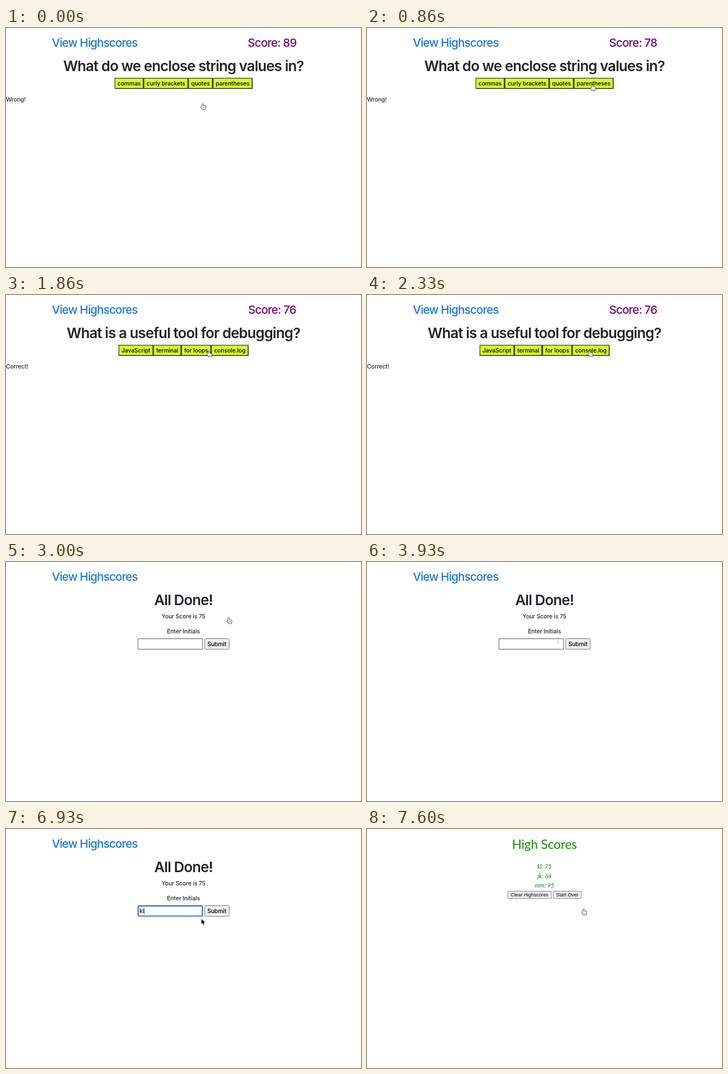
These frames come from a looping animation (640x432 px, 8 s). An HTML page with a canvas:

```html
<!DOCTYPE html>
<html lang="en">
<head>
<meta charset="utf-8">
<title>Quiz</title>
<style>
html, body { margin: 0; width: 100%; height: 100%; overflow: hidden; background: #fff; }
canvas { display: block; width: 640px; height: 432px; }
</style>
</head>
<body>
<canvas id="stage"></canvas>
<script>
const LOOP = 8000, STEP = 1000 / 15;
const SCALE = 2 / 3; // page zoom: 16px text shows as 10.67px
const MID = 320;
const canvas = document.getElementById('stage');
const ctx = canvas.getContext('2d');
const dpr = window.devicePixelRatio || 1;
canvas.width = 640 * dpr;
canvas.height = 432 * dpr;

const UI = 'Inter, "Noto Sans", sans-serif';
const ARIAL = '"Liberation Sans", Arial, sans-serif';
const SCRIPT = 'Papyrus, Lato, fantasy';
const INK = '#212529', GREEN = '#15880c';

const QUIZ = [
  { title: 'What do we enclose string values in?', note: 'Wrong!',
    answers: ['commas', 'curly brackets', 'quotes', 'parentheses'] },
  { title: 'What is a useful tool for debugging?', note: 'Correct!',
    answers: ['JavaScript', 'terminal', 'for loops', 'console.log'] }
];
const ANSWERS = { x: 197, y: 90, w: 246, h: 20 };
const INPUT = { x: 237.3, y: 138, w: 117.6, h: 20.3 };
const SUBMIT = { x: 357.5, y: 138, w: 45.3, h: 20.3 };
const T = { penalty: 130, next: 1730, done: 3000, focus: 4330, type: 5660, scores: 7600 };

const START = { x: 355, y: 137 };
const MOVES = [
  { from: 60, to: 260, x: 361, y: 154 },
  { from: 400, to: 860, x: 407, y: 103 },
  { from: 1000, to: 1530, x: 366, y: 101 },
  { from: 1860, to: 2330, x: 402, y: 101, dip: 14 },
  { from: 3530, to: 3930, x: 345, y: 141 },
  { from: 6730, to: 7530, x: 391, y: 145, dip: 29 }
];

function text(str, x, y, size, o = {}) {
  ctx.font = `${o.style || ''} ${o.weight || 400} ${size}px ${o.font || UI}`;
  ctx.letterSpacing = (o.track || 0) * size + 'px';
  ctx.textAlign = o.align || 'center';
  ctx.fillStyle = o.color || INK;
  ctx.fillText(str, x, y);
  return ctx.measureText(str).width;
}

const header = (str, x, color) => text(str, x, 34, 20.7, { color, weight: 500, track: -0.04 });
const heading = str => text(str, MID, 78.1, 26, { weight: 600, track: -0.034 });
const small = (str, x, y, o) => text(str, x, y, 10.4, { weight: 450, track: -0.008, ...o });

function box({ x, y, w, h }, fill, line, width, r) {
  ctx.beginPath();
  ctx.roundRect(x + width / 2, y + width / 2, w - width, h - width, r);
  ctx.fillStyle = fill;
  ctx.fill();
  ctx.strokeStyle = line;
  ctx.lineWidth = width;
  ctx.stroke();
}

function rect(x, y, w, h, fill) {
  ctx.fillStyle = fill;
  ctx.fillRect(x, y, w, h);
}

function answer(label, x, w) {
  const { y, h } = ANSWERS, b = 2 * SCALE;
  rect(x, y, w, h, '#4d4d43');
  rect(x + b, y + b, w - b, h - b, '#16180a');
  rect(x + b, y + b, w - 2 * b, h - 2 * b, '#d8fa2d');
  small(label, x + w / 2, 104, { color: '#000' });
}

function answerRow(labels) {
  ctx.font = `450 10.4px ${UI}`;
  ctx.letterSpacing = '-0.08px';
  const widths = labels.map(s => ctx.measureText(s).width + 16 * SCALE);
  let x = MID - widths.reduce((a, b) => a + b) / 2;
  labels.forEach((s, i) => {
    answer(s, x, widths[i]);
    x += widths[i];
  });
}

const score = t => t < T.penalty ? 89 : 78 - Math.floor((t - T.penalty) / 867);

function quiz(t) {
  const q = QUIZ[t < T.next ? 0 : 1];
  header('Score: ' + score(t), 479.7, '#720670');
  heading(q.title);
  answerRow(q.answers);
  small(q.note, 0, 132.8, { align: 'left' });
}

function form(t) {
  const focused = t >= T.focus;
  heading('All Done!');
  small('Your Score is 75', MID, 102);
  small('Enter Initials', MID, 128.8);
  box(INPUT, '#fff', focused ? '#1c67b8' : '#767676', focused ? 1.9 : 1.2, focused ? 1.5 : 0.5);
  box(SUBMIT, '#efefef', '#767676', 1, 1.8);
  small('Submit', 380.2, 152.2, { color: '#000' });

  const typed = 'kl'.slice(0, Math.max(0, Math.floor((t - T.type) / 340) + 1));
  const w = small(typed, 240.6, 152.2, { align: 'left', color: '#000' });
  const caret = t >= 5000 && (t - 5000) % 920 < 460;
  if (caret) rect(240.8 + w, 143, 0.7, 11, '#000');
}

function smallButton(label, x, w) {
  box({ x, y: 112, w, h: 14 }, '#efefef', '#767676', 0.9, 1.6);
  text(label, x + w / 2, 122.2, 8.9, { font: ARIAL, color: '#000' });
}

function scores() {
  const o = { font: SCRIPT, color: GREEN };
  text('High Scores', MID, 35.6, 22.5, o);
  ['kl: 75', 'jk: 64', 'mm: 95'].forEach((s, i) =>
    text(s, MID, 72.2 + i * 16.8, 11, { ...o, style: 'italic' }));
  smallButton('Clear Highscores', 253.3, 79.4);
  smallButton('Start Over', 335.2, 51.5);
}

const POINTERS = {
  hand() {
    const shape = new Path2D();
    shape.roundRect(-1.5, 0, 1.9, 8, 1);
    for (let i = 0; i < 3; i++) shape.roundRect(0.1 + i * 1.5, 3.3 + i * 0.4, 1.7, 5, 0.8);
    shape.roundRect(-3.5, 5, 4, 2.4, 1);
    shape.roundRect(-1.5, 5.6, 6.1, 4.4, 1.3);
    ctx.strokeStyle = '#222';
    ctx.lineWidth = 1.5;
    ctx.stroke(shape);
    ctx.fillStyle = '#fff';
    ctx.fill(shape);
    for (let i = 0; i < 3; i++) rect(i * 1.5, 6.4, 0.6, 2.2, '#777');
  },
  arrow() {
    const shape = new Path2D('M0 0V9.4L2.2 7.4L3.7 10.8L5.1 10.2L3.6 6.9H6.6Z');
    ctx.strokeStyle = '#fff';
    ctx.lineWidth = 1.2;
    ctx.stroke(shape);
    ctx.fillStyle = '#000';
    ctx.fill(shape);
  },
  beam() {
    rect(-0.3, -4, 0.6, 8, '#aaa');
    for (const y of [-4.3, 3.6]) rect(-1.5, y, 3, 0.7, '#777');
  }
};

const inside = (p, b) => p.x >= b.x && p.x <= b.x + b.w && p.y >= b.y && p.y <= b.y + b.h;

function pointerAt(t) {
  let p = START;
  for (const m of MOVES) {
    if (t < m.from) break;
    const u = Math.min(1, (t - m.from) / (m.to - m.from));
    const e = u * u * (3 - 2 * u);
    p = {
      x: p.x + (m.x - p.x) * e,
      y: p.y + (m.y - p.y) * e + (m.dip || 0) * Math.sin(Math.PI * u)
    };
  }
  return p;
}

function pointerKind(t, p) {
  // a resting hand stays until the pointer next moves
  const resting = t < MOVES[0].from || (t >= T.done && t < MOVES[4].from) || t >= MOVES[5].to;
  if (resting) return 'hand';
  if (t < T.done) return inside(p, ANSWERS) ? 'hand' : 'arrow';
  if (inside(p, INPUT)) return 'beam';
  return inside(p, SUBMIT) ? 'hand' : 'arrow';
}

function draw(now) {
  // the screen refreshes fifteen times a second
  const t = Math.floor(((now % LOOP) + 7) / STEP) * STEP % LOOP;
  ctx.setTransform(dpr, 0, 0, dpr, 0, 0);
  rect(0, 0, 640, 432, '#fff');
  if (t < T.scores) {
    header('View Highscores', 160, '#1877dc');
    t < T.done ? quiz(t) : form(t);
  } else {
    scores();
  }
  const p = pointerAt(t);
  ctx.translate(p.x, p.y);
  POINTERS[pointerKind(t, p)]();
}

let start;
function tick(now) {
  start ??= now;
  draw(now - start);
  requestAnimationFrame(tick);
}
draw(0);
requestAnimationFrame(tick);
</script>
</body>
</html>
```
